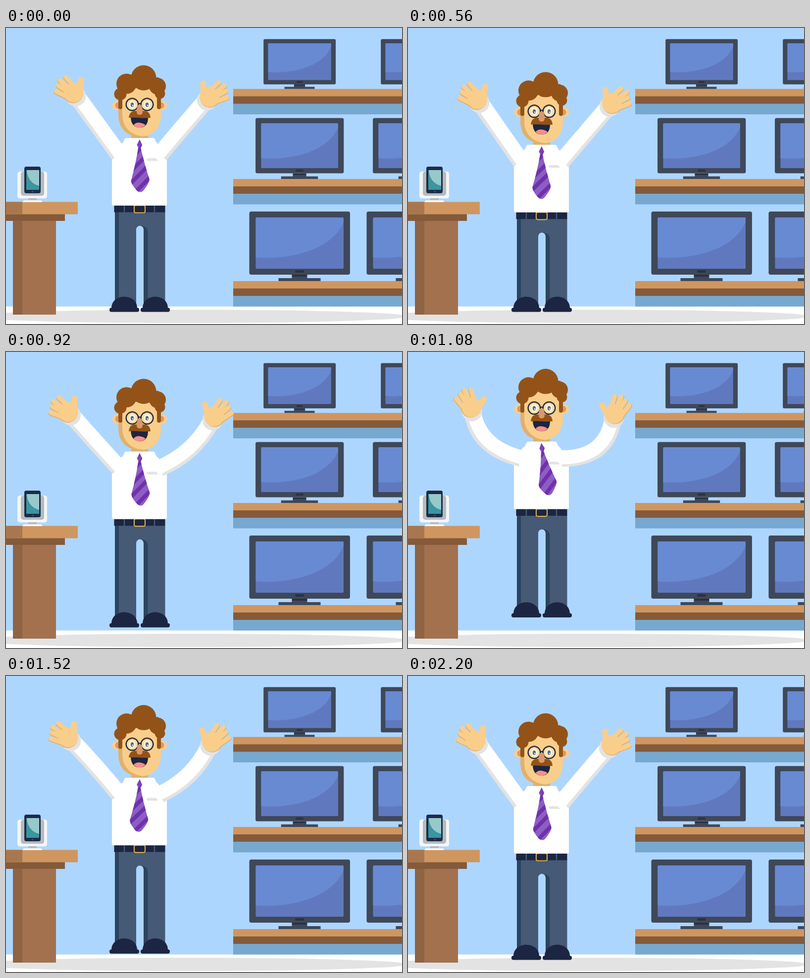
An HTML page that plays this animation: 800x600 px, repeating every 2.24 s.

```html
<!DOCTYPE html>
<html lang="en">
<head>
<meta charset="utf-8">
<title>Happy shopkeeper</title>
<style>
html, body { margin: 0; width: 100%; height: 100%; overflow: hidden; background: #fff; }
svg { display: block; width: 800px; height: 600px; }
.skin { fill: #f9ce8b; } .skinDark { fill: #e2b06c; } .hair { fill: #935318; }
.navy { fill: #1c2541; } .blush { fill: #dd9768; } .gray { fill: #e3e3e3; }
.wood { fill: #d0965f; } .woodDark { fill: #845a3b; }
.frame { fill: #3f4859; } .frameDark { fill: #2a3242; }
.sleeve { fill: none; stroke: #e3e3e3; stroke-width: 34; }
.sleeve.top { stroke: #fff; stroke-width: 28; }
.fingers { fill: none; stroke-width: 9; stroke-linecap: round; }
</style>
</head>
<body>
<svg viewBox="0 0 800 600">
  <defs>
    <g id="tv">
      <rect class="frame" x="-101.5" y="-141" width="203.5" height="128" rx="4"/>
      <rect x="-88.5" y="-129" width="177.5" height="104" rx="2" fill="#6079be"/>
      <path d="M-88.5-127q0-2 2-2H87q2 0 2 2V-120C65-62-20-43-88.5-48Z" fill="#688ad2"/>
      <rect class="frameDark" x="-9" y="-22" width="18" height="5" rx="2.5"/>
      <path class="frameDark" d="M-15.500-13h31v4h-31z"/>
      <path class="frame" d="M-15.500-9h31v3h27v6h-85v-6h27z"/>
    </g>
    <g id="shelf">
      <path class="wood" d="M459 0H800V15.500H459Z"/>
      <path class="woodDark" d="M459 15H800V30.500H459Z"/>
      <path d="M459 30H800V51.500H459Z" fill="#77a8cf"/>
    </g>
    <g id="fingers" class="fingers">
      <path d="M-24-42L-8-25M-36-36L-18-19M-39-25L-20-13M-43-13L-22-3"/>
    </g>
    <g id="hand">
      <circle class="gray" cx="-4" cy="-4" r="20.500"/>
      <g transform="translate(-1 1.500)">
        <use href="#fingers" stroke="#e2b06c"/>
        <circle class="skinDark" cx="-8" cy="-11" r="20"/>
      </g>
      <use href="#fingers" stroke="#f9ce8b"/>
      <circle class="skin" cx="-8" cy="-11" r="20"/>
      <path d="M7-37L4-13" stroke="#f9ce8b" stroke-width="12" stroke-linecap="round"/>
    </g>
    <path id="tieShape" d="M270 226L275 237L272 243Q279 275 289 307Q289 314 277 329Q271 336 264 330Q252 317 252 309Q262 275 267 243L264.500 237Z"/>
    <clipPath id="tieClip"><use href="#tieShape"/></clipPath>
  </defs>

  <rect width="800" height="564.500" fill="#add6ff"/>
  <ellipse class="gray" cx="370" cy="584.500" rx="440" ry="13.500"/>
  <g id="shop"></g>

  <g>
    <path d="M14 391H101V581H14Z" fill="#a3714d"/>
    <path d="M14 391H33V581H14Z" fill="#8e6444"/>
    <path class="woodDark" d="M0 377H119V391H0Z"/>
    <path class="wood" d="M0 352.500H145V377.500H0Z"/>
    <path d="M0 352.500H33V377.500H0Z" fill="#a9774f"/>
    <rect x="23" y="291" width="60" height="54.500" rx="5" fill="#f5f5f5"/>
    <rect x="30" y="291" width="47" height="49" rx="5" fill="#b3bcbf"/>
    <path d="M45 345H62V350H45Z" fill="#b3bcbf"/>
    <path d="M34 353q0-4 4-4H69q4 0 4 4Z" fill="#f5f5f5"/>
    <rect x="37" y="281" width="33" height="54" rx="4" fill="#1e2b47"/>
    <path d="M41 288H67V328H41Z" fill="#3a96a0"/>
    <path d="M42 288H67V320Q44 314 42 288Z" fill="#97c9cb"/>
    <rect x="52" y="330" width="4" height="3" rx="1" fill="#3b4862"/>
  </g>

  <g id="man">
    <path id="legs" fill="#465a75"/>
    <path id="legShade" fill="#2b4460"/>
    <g id="feet" class="navy">
      <path id="shoe" d="M213 568C213 537 265 537 265 568Z"/>
      <rect x="209" y="567" width="60" height="8.500" rx="4"/>
      <path d="M276 568C276 537 327 537 327 568Z"/>
      <rect x="272" y="567" width="59" height="8.500" rx="4"/>
    </g>
    <path class="navy" d="M218.500 359H321.500V373.500H218.500Z"/>
    <path d="M239 360V373.500M300 360V373.500" stroke="#465a75" stroke-width="2.500"/>
    <rect class="navy" x="259" y="359.500" width="22" height="15" rx="3" stroke="#d9ac4e" stroke-width="2.200"/>

    <path class="skinDark" d="M253 210H287V226H253Z"/>
    <path d="M214 268L231 236Q237 233 239 226Q240 223 243 223H297Q300 223 301 226Q303 233 308 236L325 268V357Q325 360 322 360H217Q214 360 214 357Z" fill="#fff"/>
    <path class="gray" d="M284 266.500Q285 264 288 264H302Q305 265 307 269.500H288Q284 269.500 284 266.500Z"/>
    <g id="tie">
      <use href="#tieShape" fill="#8c5ec4"/>
      <path clip-path="url(#tieClip)" d="M258 258L284 232M248 294L290 252M245 321L295 271M256 337L300 293" stroke="#7031ab" stroke-width="8"/>
      <path d="M270 226L275 237L270 240L264.500 237Z" fill="#7b42b5"/>
    </g>
    <g id="arms"></g>

    <circle class="skin" cx="224" cy="157" r="9.500"/>
    <circle class="skin" cx="316" cy="157" r="9.500"/>
    <circle class="blush" cx="227" cy="157" r="6.500"/>
    <circle class="blush" cx="313" cy="157" r="6.500"/>
    <path class="skinDark" d="M227 115H313V176C313 204 295 220 270 220S227 204 227 176Z"/>
    <path class="skin" d="M235 115H313V176C313 203 297 219 276 219.500C251 217 235 200 235 176Z"/>
    <g class="hair">
      <circle cx="278" cy="101" r="25.500"/>
      <circle cx="243.500" cy="113" r="20.500"/>
      <circle cx="306" cy="118" r="17"/>
      <circle cx="231" cy="134" r="12.500"/>
      <circle cx="311" cy="133" r="10.500"/>
      <path d="M240 100H308V122H240Z"/>
      <rect x="227" y="125" width="8" height="39.500" rx="4"/>
      <rect x="305" y="125" width="8" height="39.500" rx="4"/>
    </g>
    <g id="eyes"></g>
    <path d="M266.500 155Q270 151 273.500 155" fill="none" stroke="#1f2a44" stroke-width="2.400"/>
    <path class="blush" d="M266 157Q270 154 274 157L277 169Q277 177 270 177T263 169Z"/>
    <path class="navy" d="M252 181H287Q287 202 270 202T252 181Z"/>
    <path d="M257.500 197Q262 191 270 192T282 197Q277 202 270 202T257.500 197Z" fill="#f58e8c"/>
    <path class="hair" d="M248 182Q249 169 260 168Q266 168 264 170Q264 176 270 176T276 170Q274 168 280 168Q291 169 292 182Q281 183 270 182T248 182Z"/>
  </g>
</svg>
<script>
const LOOP = 2240, STEP = 40;
const $ = id => document.getElementById(id);
const smooth = u => u * u * (3 - 2 * u);

// Shelves, each with two screens that shrink with height
$('shop').innerHTML = [[123.5, .717], [306, .876], [513, 1]].map(([y, s]) =>
  `<use href="#shelf" y="${y}"/>` + [593, 830].map(x =>
    `<use href="#tv" transform="translate(${x} ${y}) scale(${s})"/>`).join('')).join('');

$('eyes').innerHTML = [255, 285].map(x => `
  <circle cx="${x}" cy="155" r="12.3" fill="#fbdda9" stroke="#1f2a44" stroke-width="2.5"/>
  <ellipse cx="${x}" cy="155" rx="6.5" ry="8" fill="#fff2d8"/>
  <ellipse cx="${x}" cy="155.500" rx="3.2" ry="4.500" fill="#536b87"/>
  <circle cx="${x + 1}" cy="157" r="1.300" fill="#fff"/>
  <path d="M${x - 6} 145Q${x} 140 ${x + 6} 145" fill="none" stroke="#4a3a35" stroke-width="2.500"/>`).join('');

$('arms').innerHTML = ['L', 'R'].map(s => `
  <g${s === 'R' ? ' transform="translate(539 0) scale(-1 1)"' : ''}>
    <path id="under${s}" class="sleeve"/>
    <path id="over${s}" class="sleeve top" transform="translate(3 -2)"/>
    <use id="hand${s}" href="#hand"/>
  </g>`).join('');

// time, left wrist, left elbow, right wrist, right elbow (relative to torso), tie angle
const poses = [
  [0,    145, 142, 186, 199, 402, 150, 356, 203, .5],
  [280,  142, 144, 184, 201, 409, 155, 360, 206, .5],
  [560,  148, 142, 188, 200, 403, 149, 357, 203, -.5],
  [920,  135, 153, 181, 205, 414, 164, 381, 226, 1],
  [1080, 131, 167, 143, 236, 414, 180, 400, 258, 8.5],
  [1400, 132, 156, 180, 207, 412, 169, 392, 244, -1.5],
  [1680, 140, 146, 184, 201, 406, 154, 359, 205, .5]
];

function poseAt(t) {
  const n = poses.length;
  const key = i => {
    const p = poses[(i + n) % n];
    return [p[0] + Math.floor(i / n) * LOOP, ...p.slice(1)];
  };
  let i = n - 1;
  while (poses[i][0] > t) i--;
  const [a, b, c, d] = [key(i - 1), key(i), key(i + 1), key(i + 2)];
  const span = c[0] - b[0], u = (t - b[0]) / span;
  return b.map((v, k) => {
    const m0 = (c[k] - a[k]) / (c[0] - a[0]) * span;
    const m1 = (d[k] - v) / (d[0] - b[0]) * span;
    const e = smooth(u);
    return v + (c[k] - v) * e + m0 * u * (1 - u) ** 2 - m1 * u * u * (1 - u);
  }).slice(1);
}

// Crouch, leap, fall, stand
function bodyY(t) {
  if (t < 600) return 14 * smooth(t / 600);
  if (t < 630) return 14;
  if (t < 1130) return 14 - 57 * smooth((t - 630) / 500);
  if (t < 1660) return -43 + 43 * ((t - 1130) / 530) ** 1.6;
  return 0;
}

function drawArm(side, wx, wy, ex, ey) {
  const d = `M${wx} ${wy}Q${ex} ${ey} 228 257`;
  $('under' + side).setAttribute('d', d);
  $('over' + side).setAttribute('d', d);
  const turn = 35.7 - Math.atan2(ex - wx, ey - wy) * 180 / Math.PI;
  $('hand' + side).setAttribute('transform', `translate(${wx} ${wy}) rotate(${turn})`);
}

function draw(t) {
  const y = bodyY(t), feet = Math.min(0, y + 4) - y, end = 562 + feet;
  $('man').setAttribute('transform', `translate(0 ${y})`);
  $('feet').setAttribute('transform', `translate(0 ${feet})`);
  $('legs').setAttribute('d', `M220 373H321.500V${end}H278V408.500a7.500 7.500 0 0 0-15 0V${end}H220Z`);
  $('legShade').setAttribute('d',
    `M220 373H228V${end}H220ZM270.500 401Q286.500 401 286.500 414V${end}H278V408.500Q278 401 270.500 401Z`);
  const [a, b, c, d, e, f, g, h, swing] = poseAt(t);
  drawArm('L', a, b, c, d);
  drawArm('R', 539 - e, f, 539 - g, h);
  $('tie').setAttribute('transform', `rotate(${-swing} 270 230)`);
}

const start = performance.now();
function tick() {
  const t = (performance.now() - start) % LOOP;
  draw(Math.floor(t / STEP) * STEP);
  requestAnimationFrame(tick);
}
tick();
</script>
</body>
</html>
```
